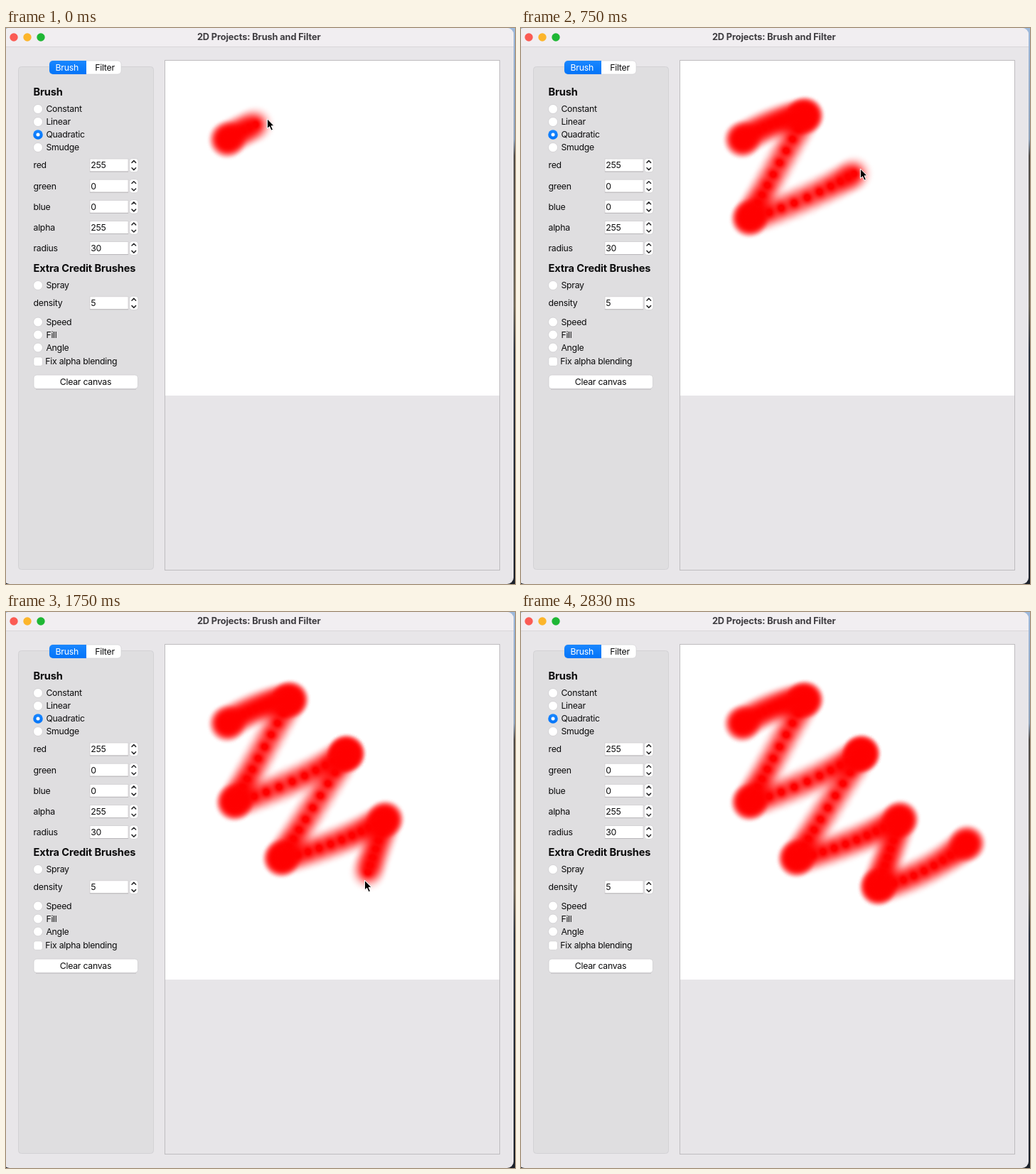
Write an HTML page with a canvas that moves like this. It is 716x782 px and loops after 3.01 s.

```html
<!DOCTYPE html>
<html lang="en">
<head>
<meta charset="utf-8">
<title>Brush and Filter</title>
<style>
  html, body { margin: 0; width: 100%; height: 100%; overflow: hidden; background: #e8e6e9; }
  svg, canvas { position: absolute; left: 0; top: 0; display: block; }
  #paper { left: 224px; top: 46px; }
  text { font: 12.3px Inter, "Open Sans", sans-serif; letter-spacing: -.26px; fill: #0c0c0d; }
  .head { font-size: 14.6px; font-weight: 700; letter-spacing: -.13px; }
  .title { font-size: 12.8px; font-weight: 700; letter-spacing: -.13px; fill: #3e3c40; }
  .mid { text-anchor: middle; }
  .box { fill: #fff; stroke: #cfcdd0; stroke-width: .8; }
  .line { stroke: #b9b7ba; }
  .chevron { fill: none; stroke: #2a2a2c; stroke-width: 1.5; stroke-linecap: round; stroke-linejoin: round; }
</style>
</head>
<body>
<svg width="716" height="782" viewBox="0 0 716 782">
  <defs>
    <linearGradient id="desk" x2="0" y2="1">
      <stop offset="0" stop-color="#9db9dc"/>
      <stop offset=".2" stop-color="#8fa3bb"/>
      <stop offset=".23" stop-color="#4d4a48"/>
      <stop offset=".5" stop-color="#6b6558"/>
      <stop offset=".58" stop-color="#2c3440"/>
      <stop offset="1" stop-color="#1b2029"/>
    </linearGradient>
    <linearGradient id="blue" x2="0" y2="1">
      <stop offset="0" stop-color="#1a87ff"/>
      <stop offset="1" stop-color="#0274f8"/>
    </linearGradient>
  </defs>
  <rect width="716" height="782" fill="url(#desk)"/>
  <rect x="-4" width="718" height="782" rx="9" fill="#e8e6e9"/>
  <path d="M-4 27V9a9 9 0 0 1 9-9H705a9 9 0 0 1 9 9V27z" fill="#f1eef1"/>
  <path d="M0 26.5H714" stroke="#d9d6d9"/>
  <circle cx="11" cy="13" r="5.7" fill="#fb5b54"/>
  <circle cx="30" cy="13" r="5.7" fill="#fcb52b"/>
  <circle cx="49" cy="13" r="5.7" fill="#1fb735"/>
  <text class="title mid" x="355.7" y="17.3">2D Projects: Brush and Filter</text>

  <rect x="17.5" y="54.5" width="190" height="707" rx="4" fill="#dfdee0" stroke="#d3d2d5"/>
  <rect x="61" y="46" width="101" height="19" rx="5" fill="#fff" stroke="#cfcdd0" stroke-width=".6"/>
  <path d="M113 46H66a5 5 0 0 0-5 5V60a5 5 0 0 0 5 5H113z" fill="url(#blue)"/>
  <text class="mid" x="85.8" y="59.8" style="fill:#fff">Brush</text>
  <text class="mid" x="139" y="59.8">Filter</text>
  <text class="head" x="38.5" y="95.3">Brush</text>
  <text class="head" x="38.5" y="343">Extra Credit Brushes</text>
  <g id="controls"></g>
  <rect class="box" x="38.8" y="462.8" width="12.6" height="12.6" rx="3"/>
  <text x="55.3" y="473.4">Fix alpha blending</text>
  <path class="line" d="M42 508H183"/>
  <rect class="box" x="39" y="488" width="146.5" height="19.3" rx="4"/>
  <text class="mid" x="112" y="501.8">Clear canvas</text>

  <rect x="223.5" y="45.5" width="471" height="717" fill="#e7e5e8" stroke="#bebcbf"/>
</svg>
<canvas id="paper" width="470" height="471"></canvas>
<svg width="716" height="782" viewBox="0 0 716 782">
  <path id="cursor" d="M0 0V13.6L3.1 10.8L5.5 16.3L8 15.2L5.6 9.9H9.6Z"
    fill="#000" stroke="#fff" stroke-linejoin="round"/>
</svg>
<script>
const label = (x, y, s) => `<text x="${x}" y="${y + 4.4}">${s}</text>`;

const radio = (y, name, on) =>
  (on ? `<circle cx="45" cy="${y}" r="6.8" fill="url(#blue)"/><circle cx="45" cy="${y}" r="2.5" fill="#fff"/>`
      : `<circle class="box" cx="45" cy="${y}" r="6.5"/>`) + label(56.4, y, name);

const field = (y, name, value) => label(38.5, y, name) +
  `<rect class="box" x="118" y="${y - 9}" width="54" height="18"/>` +
  `<path class="line" d="M118 ${y + 9}h54"/>` + label(119.2, y, value) +
  `<rect class="box" x="173.6" y="${y - 9.6}" width="12.4" height="19.4" rx="4"/>` +
  `<path class="chevron" d="M177 ${y - 3.6}l2.8-2.8 2.8 2.8M177 ${y + 3.8}l2.8 2.8 2.8-2.8"/>`;

const colorFields = ["red", "green", "blue", "alpha", "radius"];
const colorValues = [255, 0, 0, 255, 30];
document.getElementById("controls").innerHTML = [
  ...["Constant", "Linear", "Quadratic", "Smudge"].map((s, i) => radio(114 + 18 * i, s, i === 2)),
  ...colorFields.map((s, i) => field(193 + 29.15 * i, s, colorValues[i])),
  radio(362, "Spray"), field(386.8, "density", 5),
  ...["Speed", "Fill", "Angle"].map((s, i) => radio(413.5 + 18 * i, s))
].join("");

// Turning points of the zigzag; bend bows the line that follows downwards. Times are in ticks.
const turns = [
  { x: 311, y: 157, arrive: -2.1, leave: -1.3, bend: -12 },
  { x: 400, y: 123, arrive: 2.3, leave: 3.1, bend: 0 },
  { x: 321, y: 268, arrive: 6.1, leave: 6.8, bend: 12 },
  { x: 479, y: 199, arrive: 9.8, leave: 11.8, bend: 0 },
  { x: 387, y: 347, arrive: 14.8, leave: 15.6, bend: 12 },
  { x: 534, y: 291, arrive: 18.8, leave: 19.4, bend: 0 },
  { x: 502, y: 387, arrive: 22.2, leave: 23.2, bend: 18 },
  { x: 628, y: 325, arrive: 26.2, leave: 26.6, bend: 0 }
];

const LOOP = 3010, TICK = 1000 / 12, DABS_PER_TICK = 5;
const RADIUS = 30, GAIN = 1.3, LEAD = .4, HIDE = 30;

// Smoothstep, skewed so the hand starts quickly and settles slowly.
function ease(u) {
  const w = 1 - (1 - u) ** 1.4;
  return w * w * (3 - 2 * w);
}

function handAt(tick) {
  const i = turns.findLastIndex(t => t.arrive <= tick + 1e-6);
  const a = turns[Math.max(i, 0)], b = turns[i + 1];
  if (!b || tick <= a.leave) return a;
  const s = ease((tick - a.leave) / (b.arrive - a.leave));
  return {
    x: a.x + (b.x - a.x) * s,
    y: a.y + (b.y - a.y) * s + 2 * a.bend * s * (1 - s)
  };
}

const ctx = document.getElementById("paper").getContext("2d");
const cursor = document.getElementById("cursor");

// Opacity is quadratic in the distance to the rim, saturated at the core.
const falloff = ctx.createRadialGradient(0, 0, 0, 0, 0, RADIUS);
for (let i = 0; i <= 24; i++) {
  const d = i / 24;
  falloff.addColorStop(d, `rgba(255,0,0,${Math.min(1, GAIN * (1 - d) ** 2).toFixed(4)})`);
}

function paint(tick) {
  ctx.setTransform(1, 0, 0, 1, 0, 0);
  ctx.fillStyle = "#fff";
  ctx.fillRect(0, 0, 470, 471);
  ctx.fillStyle = falloff;
  const first = Math.round(turns[0].arrive * DABS_PER_TICK);
  const last = Math.round(Math.min(tick, turns.at(-1).leave) * DABS_PER_TICK);
  for (let n = first; n <= last; n++) {
    const p = handAt(n / DABS_PER_TICK);
    ctx.setTransform(1, 0, 0, 1, p.x - 224, p.y - 46);
    ctx.fillRect(-RADIUS, -RADIUS, 2 * RADIUS, 2 * RADIUS);
  }
}

let shown = -1;
function draw(now) {
  const tick = Math.floor((now % LOOP + 7) / TICK);
  if (tick === shown) return;
  shown = tick;
  paint(tick);
  const p = handAt(tick + LEAD);
  cursor.setAttribute("transform", `translate(${p.x} ${p.y - 2})`);
  cursor.setAttribute("visibility", tick < HIDE ? "visible" : "hidden");
}

const origin = performance.now();
function loop() {
  draw(performance.now() - origin);
  requestAnimationFrame(loop);
}
loop();
</script>
</body>
</html>
```
